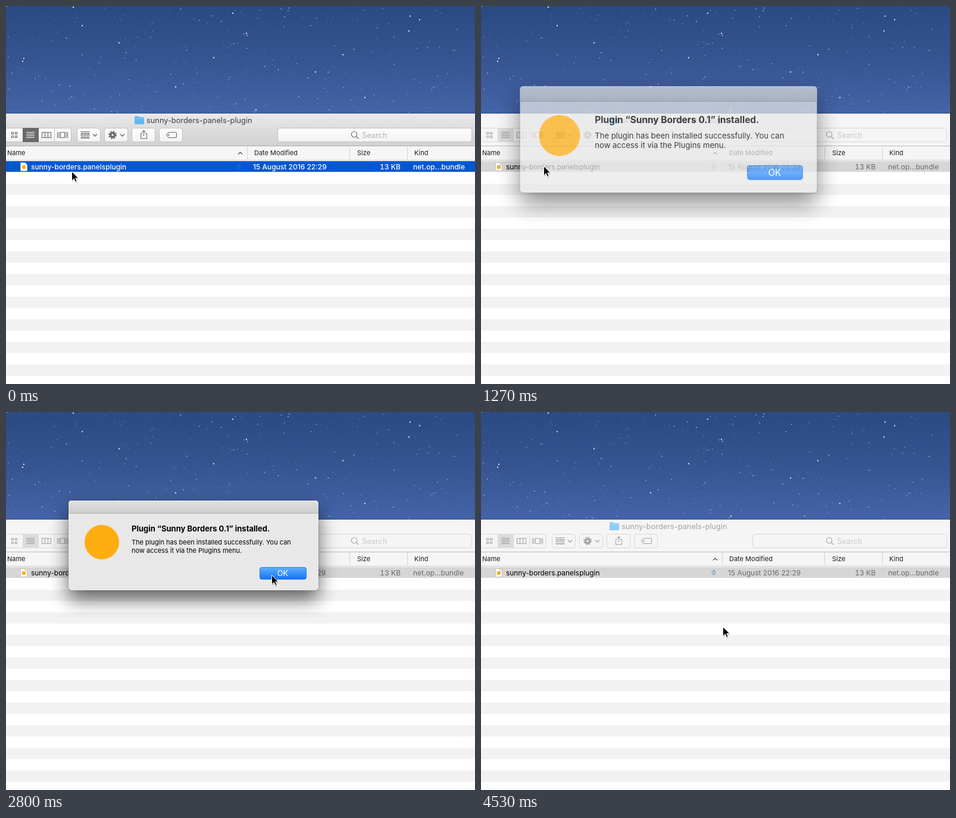
An HTML page that plays this animation: 788 by 636 pixels, repeating every 4590 ms.

```html
<!DOCTYPE html>
<html lang="en">
<head>
<meta charset="utf-8">
<title>Plugin install</title>
<style>
  html, body { margin: 0; width: 100%; height: 100%; overflow: hidden; background: #fff; }
  svg { display: block; width: 788px; height: 636px; }
  text { font-family: Inter, Roboto, sans-serif; white-space: pre; }

  #win {
    --bar: url(#barOn); --edge: #aeaeae; --btn: url(#btnOn); --btnEdge: #c2c2c2;
    --icon: #6a6a6a; --seg: #696969; --segIcon: #fff; --title: #3f3f3f; --hint: #b2b2b2;
    --folder: #63b5f2; --row: #0058d0; --name: #fff; --info: #fff; --sync: #2d77dc; --head: #f6f6f6;
  }
  #win.off {
    --bar: #f5f5f5; --edge: #bababa; --btn: #f5f5f5; --btnEdge: #d8d8d8;
    --icon: #a4a4a4; --seg: #dcdcdc; --segIcon: #929292; --title: #a3a3a3; --hint: #c9c9c9;
    --folder: #8accf8; --row: #d6d6d6; --name: #000; --info: #6a6a6a; --sync: #3f86d8; --head: #f5f5f5;
  }
  .btn { fill: var(--btn); stroke: var(--btnEdge); }
  .icon { fill: none; stroke: var(--icon); stroke-width: 1.1; }
  .head { font-size: 11px; fill: #1c1c1c; }
  .row { font-size: 12px; font-weight: 500; fill: var(--info); }
  .off .row { font-weight: 400; }
  #ok { fill: url(#okUp); stroke: #2a7be4; }
  .down #ok { fill: url(#okDown); stroke: #0f57c4; }
  .down #okText { opacity: .8; }
</style>
</head>
<body>
<svg viewBox="0 0 788 636">
  <defs>
    <linearGradient id="sky" x2="0" y2="1">
      <stop stop-color="#2b4983"/><stop offset=".5" stop-color="#36548f"/><stop offset="1" stop-color="#4564a8"/>
    </linearGradient>
    <linearGradient id="barOn" x2="0" y2="1"><stop stop-color="#e9e9e9"/><stop offset="1" stop-color="#d1d1d1"/></linearGradient>
    <linearGradient id="btnOn" x2="0" y2="1"><stop stop-color="#fdfdfd"/><stop offset="1" stop-color="#f3f3f3"/></linearGradient>
    <linearGradient id="cap" x2="0" y2="1"><stop stop-color="#e2e2e2"/><stop offset="1" stop-color="#cecece"/></linearGradient>
    <linearGradient id="okUp" x2="0" y2="1"><stop stop-color="#62aefb"/><stop offset="1" stop-color="#1173fb"/></linearGradient>
    <linearGradient id="okDown" x2="0" y2="1"><stop stop-color="#3f8df5"/><stop offset="1" stop-color="#0a5be3"/></linearGradient>
    <filter id="blur" x="-30%" y="-60%" width="160%" height="220%"><feGaussianBlur stdDeviation="16"/></filter>
    <clipPath id="box"><rect x="105" y="149" width="420" height="151" rx="5"/></clipPath>
  </defs>

  <rect width="788" height="181" fill="url(#sky)"/>
  <g id="stars" fill="#dfeaff"></g>

  <g id="win">
    <rect y="181" width="788" height="455" fill="#fff"/>
    <g id="stripes" fill="#f2f2f2"></g>
    <rect y="180" width="788" height="1" fill="#1d2f58" opacity=".5"/>
    <rect y="181" width="788" height="55" style="fill:var(--bar)"/>
    <rect y="181" width="788" height="1" fill="#fff" opacity=".6"/>
    <rect y="235" width="788" height="1" style="fill:var(--edge)"/>

    <path d="M216 187q0-1.500 1.500-1.500h4.500l1.500 1.500h7q1.500 0 1.500 1.500v9q0 1.500-1.500 1.500h-13q-1.500 0-1.500-1.500z" style="fill:var(--folder)"/>
    <path d="M216.500 189.500h15" stroke="#fff" opacity=".35"/>
    <text x="236" y="197" font-size="12.800" style="fill:var(--title)">sunny-borders-panels-plugin</text>

    <g class="btn">
      <rect x="-8.500" y="205.500" width="118" height="23" rx="4"/>
      <rect x="119.500" y="205.500" width="39" height="23" rx="4"/>
      <rect x="165.500" y="205.500" width="39" height="23" rx="4"/>
      <rect x="211.500" y="205.500" width="39" height="23" rx="4"/>
      <rect x="257.500" y="205.500" width="39" height="23" rx="4"/>
      <rect x="456.500" y="205.500" width="326" height="23" rx="4"/>
      <path d="M81.500 206v22"/>
    </g>
    <rect x="28" y="205" width="27" height="24" style="fill:var(--seg)"/>
    <path d="M34 212.500h14M34 215.500h14M34 218.500h14M34 221.500h14" style="stroke:var(--segIcon)"/>
    <g class="icon">
      <path d="M9.500 212.500h3v3h-3zM15.500 212.500h3v3h-3zM9.500 218.500h3v3h-3zM15.500 218.500h3v3h-3z"/>
      <path d="M60.500 212.500h15v9h-15zM65.500 212.500v9M70.500 212.500v9"/>
      <path d="M86.500 212v10M89 212v10M91.500 212.500h7v9h-7zM101 212v10M103.500 212v10"/>
      <path d="M125 211.500h16M125 217.500h16M126.500 214h3v1.500h-3zM131.500 214h3v1.500h-3zM136.500 214h3v1.500h-3zM126.500 220h3v2.500h-3zM131.500 220h3v2.500h-3zM136.500 220h3v2.500h-3z"/>
      <path d="M146 215.500l3.500 3.500 3.500-3.500M192 215.500l3.500 3.500 3.500-3.500" stroke-width="1.500"/>
      <circle cx="179" cy="217" r="3.500" stroke-width="3.400"/>
      <circle cx="179" cy="217" r="6" stroke-width="2" stroke-dasharray="2.400 2.312"/>
      <path d="M229 214.500h-2.500v8.500h10v-8.500h-2.500M231.500 219v-9M228.500 212.500l3-3 3 3"/>
      <path d="M269.500 217l4-4.500h11q2 0 2 2v5q0 2-2 2h-11z"/>
      <circle cx="273.500" cy="217" r=".6"/>
      <circle cx="585" cy="216" r="4.700"/>
      <path d="M588.500 219.500l4 4"/>
    </g>
    <text x="598" y="222" font-size="12.800" style="fill:var(--hint)">Search</text>

    <rect y="236" width="788" height="23" style="fill:var(--head)"/>
    <path d="M0 259.500h788" stroke="#c9c9c9"/>
    <path d="M405.500 237v21M577.500 237v21M674.500 237v21" stroke="#d2d2d2"/>
    <path d="M390 249.500l3.500-3.500 3.500 3.500" fill="none" stroke="#444" stroke-width="1.200"/>
    <g class="head">
      <text x="2" y="251">Name</text>
      <text x="417" y="251">Date Modified</text>
      <text x="590" y="251">Size</text>
      <text x="686" y="251">Kind</text>
    </g>

    <rect y="261" width="788" height="18" style="fill:var(--row)"/>
    <path d="M24.500 263.500h7.500l3.500 3.500v10.500h-11z" fill="#fff" stroke="#b9b9b9" stroke-width=".8"/>
    <path d="M32 263.500v3.500h3.500" fill="none" stroke="#b9b9b9" stroke-width=".8"/>
    <circle cx="30" cy="271" r="3.200" fill="#fdad12"/>
    <g class="row">
      <text x="42" y="275" font-size="11.900" style="fill:var(--name)">sunny-borders.panelsplugin</text>
      <text x="415" y="275">15 August 2016 22:29</text>
      <text x="663" y="275" text-anchor="end" style="font-variant-numeric:tabular-nums">13 KB</text>
      <text x="684" y="275">net.op…bundle</text>
    </g>
    <path d="M388.300 271.500a3 3 0 0 1 3.700-4M393.700 268.800a3 3 0 0 1-3.700 4M390.800 265.800l1.700 1.600-1.800 1.500M391.200 274.500l-1.700-1.600 1.800-1.500" fill="none" style="stroke:var(--sync)"/>
  </g>

  <g id="dialog">
    <rect x="105" y="165" width="420" height="151" rx="5" opacity=".6" filter="url(#blur)"/>
    <rect x="104.500" y="148.500" width="421" height="152" rx="5.500" opacity=".25"/>
    <g clip-path="url(#box)">
      <rect x="105" y="149" width="420" height="151" fill="#e8e8e8"/>
      <rect x="105" y="149" width="420" height="21" fill="url(#cap)"/>
      <rect x="105" y="149" width="420" height="1" fill="#fff" opacity=".5"/>
      <rect x="105" y="170" width="420" height="1" fill="#b3b3b3"/>
    </g>
    <circle cx="161" cy="219" r="29" fill="#fdad12"/>
    <text x="211" y="201" font-size="13" font-weight="700">Plugin “Sunny Borders 0.1” installed.</text>
    <text font-size="11"><tspan x="211" y="223">The plugin has been installed successfully. You can</tspan><tspan x="211" y="237">now access it via the Plugins menu.</tspan></text>
    <rect id="ok" x="426.500" y="261.500" width="78" height="20" rx="3.500"/>
    <text id="okText" x="465" y="276" font-size="12.800" text-anchor="middle" fill="#fff">OK</text>
  </g>

  <g id="cursor">
    <path d="M.5 1v15.500l3.700-3.400 2.400 5.300 2.500-1.100-2.300-5.100h5z" opacity=".25" transform="translate(.5 1.500)"/>
    <path d="M.5.5v15.500l3.700-3.400 2.400 5.300 2.500-1.100-2.300-5.100h5z" stroke="#fff"/>
  </g>
</svg>

<script>
const LOOP = 4590, STEP = 200 / 3;
const $ = id => document.getElementById(id);

function add(parent, tag, attrs) {
  const el = document.createElementNS('http://www.w3.org/2000/svg', tag);
  for (const key in attrs) el.setAttribute(key, attrs[key]);
  parent.append(el);
}

for (let y = 299; y < 636; y += 38) add($('stripes'), 'rect', { y, width: 788, height: 19 });

let seed = 77;
const rand = () => (seed = (seed * 16807) % 2147483647) / 2147483647;
const star = (cx, cy, r, opacity) => add($('stars'), 'circle', { cx, cy, r, opacity });

for (let i = 0; i < 620; i++) {
  const glow = rand() ** 3;
  star(rand() * 788, rand() * 179, .5 + glow * .5, .16 + glow * .5);
}
const bright = [[30, 88], [28, 93], [349, 87], [404, 46], [381, 12], [190, 62], [520, 111], [677, 42],
  [679, 17], [695, 23], [566, 82], [285, 136], [128, 33], [113, 2], [420, 175], [603, 154]];
for (const [x, y] of bright) star(x, y, 1.2, .9);

// time, x, y
const path = [[0, 110, 278], [530, 109, 275], [800, 105, 269], [1670, 105, 269], [2130, 422, 273],
  [2670, 440, 273], [2930, 452, 275], [3200, 460, 270], [4070, 460, 270], [4470, 406, 361]];
// time, scale, opacity
const popup = [[1130, 1.3, 0], [1200, 1.25, .35], [1270, 1.186, .75], [1330, 1.05, .92],
  [1400, 1.007, .97], [1470, 1, 1], [3800, 1, 1], [4000, 1, 0]];

const linear = p => p;
const smooth = p => p * p * (3 - 2 * p);

function sample(keys, t, ease) {
  const i = keys.findIndex(key => key[0] > t);
  if (i < 0) return keys[keys.length - 1].slice(1);
  if (i === 0) return keys[0].slice(1);
  const a = keys[i - 1], b = keys[i];
  const p = ease((t - a[0]) / (b[0] - a[0]));
  return a.slice(1).map((v, n) => v + (b[n + 1] - v) * p);
}

function draw(now) {
  const t = Math.floor((now % LOOP) / STEP + .05) * STEP;
  const [x, y] = sample(path, t, smooth);
  const [scale, opacity] = sample(popup, t, linear);
  const dialog = $('dialog');

  $('cursor').setAttribute('transform', `translate(${Math.round(x)} ${Math.round(y)})`);
  $('win').classList.toggle('off', t > 720);
  dialog.setAttribute('transform', `translate(315 224.5) scale(${scale}) translate(-315 -224.5)`);
  dialog.style.opacity = opacity;
  dialog.style.display = opacity > 0 ? '' : 'none';
  dialog.classList.toggle('down', t > 3190 && t < 3790);
}

const start = performance.now();
function tick() {
  draw(performance.now() - start);
  requestAnimationFrame(tick);
}
tick();
</script>
</body>
</html>
```
